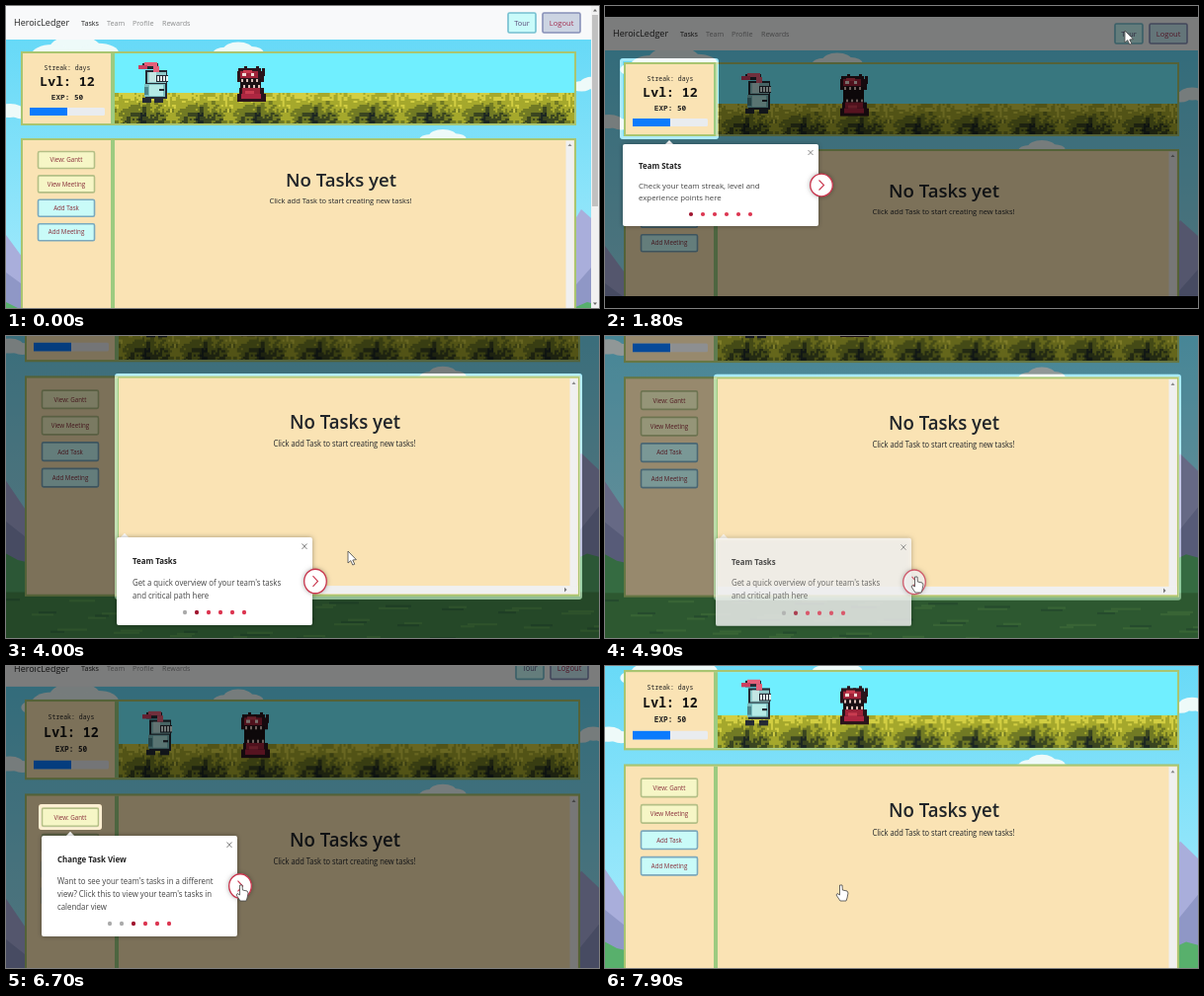
These frames come from a looping animation (600 px wide and 306 px high, 8000 ms). An HTML page with a canvas:

```html
<!DOCTYPE html>
<html lang="en">
<head>
<meta charset="utf-8">
<title>Team task tour</title>
<style>
html, body { margin: 0; width: 100%; height: 100%; overflow: hidden; background: #000; }
canvas { display: block; width: 600px; height: 306px; }
</style>
</head>
<body>
<canvas id="stage" width="600" height="306"></canvas>
<script>
const g = document.getElementById('stage').getContext('2d');
const LOOP = 8000, STRETCH = 1.085;
const CUT = 500, OPEN = 1300;
const SANS = '"Open Sans", "Noto Sans", sans-serif';
const MONO = '"Noto Sans Mono", "DejaVu Sans Mono", monospace';
const CREAM = '#fae3b4', EDGE = '#a9c571';

const clamp = v => Math.max(0, Math.min(1, v));
const ramp = (t, a, b) => clamp((t - a) / (b - a));
const ease = p => p * p * (3 - 2 * p);

// Interpolates [time, value, ...] stops with easing between them.
function track(t, stops) {
  let v = stops[0].slice(1);
  for (let i = 1; i < stops.length; i++) {
    const [t0] = stops[i - 1], [t1, ...to] = stops[i];
    if (t >= t0) v = v.map((_, k) =>
      stops[i - 1][k + 1] + (to[k] - stops[i - 1][k + 1]) * ease(ramp(t, t0, t1)));
  }
  return v;
}

function rect(color, x, y, w, h) {
  g.fillStyle = color;
  g.fillRect(x, y, w, h);
}

function text(str, x, y, size, color = '#222', align = 'left', weight = 400, family = SANS) {
  g.font = `${weight} ${size}px ${family}`;
  g.textAlign = align;
  g.textBaseline = 'alphabetic';
  g.fillStyle = color;
  g.fillText(str, x, y + size * 0.36);
}

function round(x, y, w, h, r) {
  g.beginPath();
  g.roundRect(x, y, w, h, r);
}

function line(color, width, ...pts) {
  g.beginPath();
  pts.forEach(([x, y]) => g.lineTo(x, y));
  g.strokeStyle = color;
  g.lineWidth = width;
  g.stroke();
}

function polygon(color, ...pts) {
  g.beginPath();
  pts.forEach(([x, y]) => g.lineTo(x, y));
  g.closePath();
  g.fillStyle = color;
  g.fill();
}

function ellipse(color, x, y, rx, ry = rx) {
  g.beginPath();
  g.ellipse(x, y, rx, ry, 0, 0, 7);
  g.fillStyle = color;
  g.fill();
}

function button(label, x, y, w, h, fill, border, ink, size) {
  round(x + 1, y + 1, w - 2, h - 2, 1.5);
  g.fillStyle = fill;
  g.fill();
  g.strokeStyle = border;
  g.lineWidth = 1.6;
  g.stroke();
  text(label, x + w / 2, y + h / 2, size, ink, 'center');
}

function makeHedge() {
  const c = document.createElement('canvas');
  c.width = 466;
  c.height = 31;
  const h = c.getContext('2d');
  const shades = ['#1c2622', '#3a4520', '#717a24', '#a5a82c', '#d2ce42'];
  const noise = (x, y) => {
    const n = Math.sin(x * 127.1 + y * 311.7) * 43758.5453;
    return n - Math.floor(n);
  };
  for (let y = 0; y < 16; y++) {
    for (let x = 0; x < 233; x++) {
      const col = x % 29;
      const hump = Math.cos(col / 29 * Math.PI * 2) + Math.cos(col / 29 * Math.PI * 6) * 0.4;
      const clump = noise(col >> 1, y >> 1) * 0.7 + noise(col, y) * 0.3 - 0.5;
      const v = 3.7 - y * 0.17 + hump * (0.1 + y / 16) + clump * 2;
      h.fillStyle = shades[Math.max(0, Math.min(4, Math.round(v)))];
      h.fillRect(x * 2, y * 2, 2, 2);
    }
  }
  return c;
}
const hedge = makeHedge();

function cloud(x, y, s) {
  [[0, 0, 1], [-0.9, 0.25, 0.8], [0.9, 0.2, 0.8], [-1.6, 0.4, 0.5], [1.6, 0.4, 0.5]].forEach(([dx, dy, r]) =>
    ellipse('#eefaf9', x + dx * s, y + dy * s, r * s, r * s * 0.5));
}

function backdrop() {
  const sky = g.createLinearGradient(0, 30, 0, 260);
  sky.addColorStop(0, '#66d9f7');
  sky.addColorStop(1, '#9be8fb');
  rect(sky, 0, 0, 600, 420);
  cloud(442, 132, 14);
  cloud(4, 106, 14);
  cloud(594, 78, 13);
  cloud(70, 43, 26);
  cloud(235, 44, 15);
  polygon('#a9aedb', [0, 232], [22, 262], [80, 250], [300, 280], [560, 242], [582, 206], [600, 222], [600, 420], [0, 420]);
  polygon('#8f97c6', [0, 270], [30, 292], [570, 290], [600, 256], [600, 420], [0, 420]);
  polygon('#58b06c', [0, 300], [12, 306], [40, 312], [560, 312], [588, 300], [600, 303], [600, 420], [0, 420]);
  rect('#4a9150', 0, 336, 600, 90);
  for (let i = 0; i < 70; i++) {
    rect(i % 3 ? '#5ca557' : '#3d7c4a', i * 83 % 600, 342 + i * 17 % 45, 14 + i % 5 * 4, 2);
  }
}

function nav(shift) {
  rect('#f8f9fa', 0, 0, 600, 34);
  text('HeroicLedger', 8, 17, 9, '#222');
  [['Tasks', 76], ['Team', 102], ['Profile', 128], ['Rewards', 158]].forEach(([s, x], i) =>
    text(s, x, 17, 7.2, i ? '#8b8c8d' : '#222'));
  button('Tour', 515 - shift, 6, 30, 22, '#c9fbfa', '#74bfd0', '#5a4a78', 7.4);
  button('Logout', 550 - shift, 6, 40, 22, shift ? '#ccd4e2' : '#c9ecf4', '#8790b8', '#a22f50', 7.6);
}

function knight(x, y, t) {
  const bob = Math.floor(t / 400) % 2 * 2;
  const step = Math.floor(t / 200) % 2 * 2;
  const part = (c, dx, dy, w, h) => rect(c, x + dx, y + dy - (dy < 34 ? bob : 0), w, h);
  part('#242a34', 2, 36, 9, 5);
  part('#242a34', 14 + step, 36, 9, 5);
  part('#242a34', 5, 8, 22, 29);
  part('#8fc9c9', 7, 10, 19, 11);
  part('#c4e6e3', 9, 10, 7, 10);
  part('#242a34', 16, 13, 12, 7);
  [17, 20, 23, 26].forEach(dx => part('#e6f3ef', dx, 14, 2, 5));
  part('#7bbfc1', 4, 22, 21, 13);
  part('#b4eae6', 9, 23, 14, 11);
  part('#4c858c', 4, 25, 4, 8);
  part('#242a34', 19, 27, 5, 2);
  part('#242a34', 2, 1, 16, 6);
  part('#e4607a', 4, 0, 13, 4);
  part('#cc3f60', -2, 3, 9, 4);
  part('#e4607a', 13, 4, 6, 6);
}

function monster(x, y, t) {
  const phase = t % 800;
  const gap = phase >= 150 && phase < 550 ? 6 : phase >= 550 && phase < 650 ? 3 : 0;
  const top = y - gap / 2 - 1, low = y + gap * 0.6;
  for (let i = 0; i < 5; i++) rect('#2a141c', x + 1 + i * 6, top + (i + 1) % 2 * 2, 3, 8);
  rect('#2a141c', x + 4, top + 2, 20, 5);
  rect('#2a141c', x, top + 5, 27, 11);
  rect('#9f2339', x + 3, top + 5, 18, 7);
  rect('#c93c50', x + 6, top + 4, 9, 3);
  rect('#f2dfda', x + 5, top + 7, 4, 3);
  rect('#f2dfda', x + 14, top + 7, 3, 3);
  rect('#1a1014', x + 3, top + 13, 21, 10 + gap);
  for (let i = 0; i < 4; i++) {
    rect('#d9bdb6', x + 4 + i * 5, top + 13, 2, 3);
    rect('#d9bdb6', x + 6 + i * 5, low + 18, 2, 3);
  }
  rect('#2a141c', x + 2, low + 21, 25, 7);
  rect('#9f2339', x + 5, low + 21, 18, 7);
  rect('#2a141c', x, low + 27, 29, 8);
  rect('#ad2741', x + 4, low + 27, 20, 5);
  rect('#c93c50', x + 8, low + 24, 9, 3);
}

function panel(y, h, divider) {
  rect(EDGE, 19, y, 562, h);
  rect(CREAM, 21, y + 2, 558, h - 4);
  rect('#9ccb80', divider, y + 2, 4, h - 4);
}

function statsPanel(t) {
  panel(46, 75, 110);
  text('Streak: days', 66, 62.5, 6.5, '#222', 'center', 500, MONO);
  text('Lvl: 12', 66, 76.5, 13.2, '#111', 'center', 700, MONO);
  text('EXP: 50', 66, 92, 7.7, '#222', 'center', 600, MONO);
  round(28, 103, 76, 8, 1.5);
  g.fillStyle = '#e9ecef';
  g.fill();
  rect('#0b7bfd', 28, 103, 38, 8);
  rect('#70efff', 114, 48, 465, 71);
  g.drawImage(hedge, 114, 88, 465, 31);
  knight(140, 57, t);
  monster(238, 62, t);
}

function tasksPanel() {
  panel(134, 206, 110);
  ['View: Gantt', 'View Meeting', 'Add Task', 'Add Meeting'].forEach((label, i) =>
    button(label, 35.5, 146.5 + i * 24.4, 59, 19,
      i < 2 ? '#f6f6c6' : '#c9fbf8', i < 2 ? '#b4bf86' : '#7ba9bd', '#872c38', 6.2));
  text('No Tasks yet', 343, 176.5, 18.6, '#212529', 'center', 600);
  text('Click add Task to start creating new tasks!', 342.5, 197.7, 7.5, '#212529', 'center');
  rect('#f0f0f0', 570.5, 136.5, 8, 201);
  rect('#f0f0f0', 114, 330, 464.5, 7.5);
  polygon('#8a8a8a', [572.5, 142], [574.5, 139.5], [576.5, 142]);
  polygon('#777', [565, 331.5], [567.5, 333.7], [565, 336]);
}

// Each step appears at "from" and leaves when its next button is clicked at "to".
const steps = [
  { from: OPEN, to: 3000, hole: [15, 42, 100, 82], x: 18, y: 129, h: 83, caret: 65, title: 'Team Stats',
    lines: ['Check your team streak, level and', 'experience points here'] },
  { from: 3380, to: 4880, hole: [110, 131.8, 473, 211], x: 112, y: 284.8, h: 82, caret: 120, title: 'Team Tasks',
    lines: ["Get a quick overview of your team's tasks", 'and critical path here'] },
  { from: 5250, to: 7680, hole: [33, 143.8, 64, 24], x: 36, y: 173.3, h: 94, caret: 65, title: 'Change Task View',
    lines: ["Want to see your team's tasks in a different", "view? Click this to view your team's tasks in", 'calendar view'] }
];

function mask({ hole }, alpha) {
  if (alpha <= 0) return;
  const [x, y, w, h] = hole;
  g.globalAlpha = alpha;
  g.beginPath();
  g.rect(0, 0, 600, 450);
  g.roundRect(x, y, w, h, 3);
  g.fillStyle = 'rgba(0,0,0,.5)';
  g.fill('evenodd');
  round(x + 1.5, y + 1.5, w - 3, h - 3, 2);
  g.strokeStyle = 'rgba(255,255,255,.4)';
  g.lineWidth = 3;
  g.stroke();
  g.globalAlpha = 1;
}

function popover({ x, y, h, caret, title, lines }, index, alpha) {
  if (alpha <= 0) return;
  g.save();
  g.globalAlpha = alpha;
  polygon('#fff', [caret - 5, y + 1], [caret, y - 4], [caret + 5, y + 1]);
  g.shadowColor = 'rgba(0,0,0,.35)';
  g.shadowBlur = 5;
  round(x, y, 198, h, 2);
  g.fillStyle = '#fff';
  g.fill();
  g.shadowColor = 'transparent';
  line('#666', 0.8, [x + 187.5, y + 6], [x + 192.5, y + 11]);
  line('#666', 0.8, [x + 192.5, y + 6], [x + 187.5, y + 11]);
  text(title, x + 16, y + 22, 7.9, '#222', 'left', 700);
  lines.forEach((s, i) => text(s, x + 16, y + 42 + i * 12, 7.85, '#444'));
  for (let i = 0; i < 6; i++) {
    ellipse(i < index ? '#aaa' : i === index ? '#a0152f' : '#dc3550', x + 69 + i * 12, y + h - 12, 2.1);
  }
  const bx = x + 201, by = y + h / 2;
  g.shadowColor = 'rgba(0,0,0,.4)';
  ellipse('#fff', bx, by, 11.5);
  g.shadowColor = 'transparent';
  g.beginPath();
  g.arc(bx, by, 11.3, 0, 7);
  g.strokeStyle = '#c9344c';
  g.lineWidth = 1.3;
  g.stroke();
  line('#c9344c', 1.1, [bx - 2.5, by - 5], [bx + 2.5, by], [bx - 2.5, by + 5]);
  g.restore();
}

function tour(t) {
  steps.forEach((step, i) => {
    const { from, to } = step;
    const leave = 1 - ramp(t, to, to + 100);
    mask(step, ramp(t, from, from + 130) * leave);
    popover(step, i, ramp(t, from + 110, from + 400) * leave);
  });
}

function pointer(x, y, hand) {
  g.save();
  g.translate(x, y);
  g.beginPath();
  const outline = hand
    ? [[-1.5, 0], [1, 0], [1.3, 5], [6, 6], [7, 8], [6, 13], [5, 16], [-1, 16], [-5, 10], [-4, 8.5], [-1.5, 10]]
    : [[0, 0], [0, 12], [2.8, 9.6], [4.8, 14], [6.8, 13.2], [4.8, 9], [8.4, 8.6]];
  outline.forEach(p => g.lineTo(...p));
  g.closePath();
  g.fillStyle = '#fff';
  g.fill();
  g.strokeStyle = '#444';
  g.lineWidth = 0.8;
  g.stroke();
  g.restore();
}

function pageScrollbar() {
  rect('#f1f1f1', 592, 0, 8, 306);
  rect('#c1c1c1', 593, 9, 6, 194);
  polygon('#666', [594, 5.5], [596, 3], [598, 5.5]);
  polygon('#666', [594, 300.5], [596, 303], [598, 300.5]);
}

function draw(t) {
  const barred = t >= CUT && t < 3000;
  const locked = t >= OPEN; // the open tour hides the page scrollbar
  const [scroll] = track(t, [[3000, 0], [3370, 105], [4880, 105], [5250, 16], [7700, 16], [8070, 69]]);

  rect('#000', 0, 0, 600, 306);
  g.save();
  if (barred) g.translate(0, 11);
  else if (t >= CUT) {
    g.translate(0, -scroll);
    g.scale(1, STRETCH);
  }
  backdrop();
  nav(locked ? 0 : 8);
  g.save();
  if (!locked) g.translate(-4, 0);
  statsPanel(t);
  tasksPanel();
  g.restore();
  if (!locked) pageScrollbar();
  tour(t);
  g.restore();

  if (barred) {
    rect('#000', 0, 0, 600, 11);
    rect('#000', 0, 294, 600, 12);
  }
  if (t >= CUT) {
    const [x, y] = track(t, [[500, 470, 110], [1150, 526, 25], [1850, 526, 25], [2650, 227, 172],
      [3150, 227, 172], [3850, 346, 218], [4100, 346, 218], [4750, 315, 244],
      [5500, 315, 244], [6500, 238, 222], [7900, 239, 222]]);
    pointer(x, y, (t > 2600 && t < 3200) || (t > 4700 && t < 5000) || t > 6400);
  }
}

function frame(now) {
  draw(now % LOOP);
  requestAnimationFrame(frame);
}
requestAnimationFrame(frame);
</script>
</body>
</html>
```
